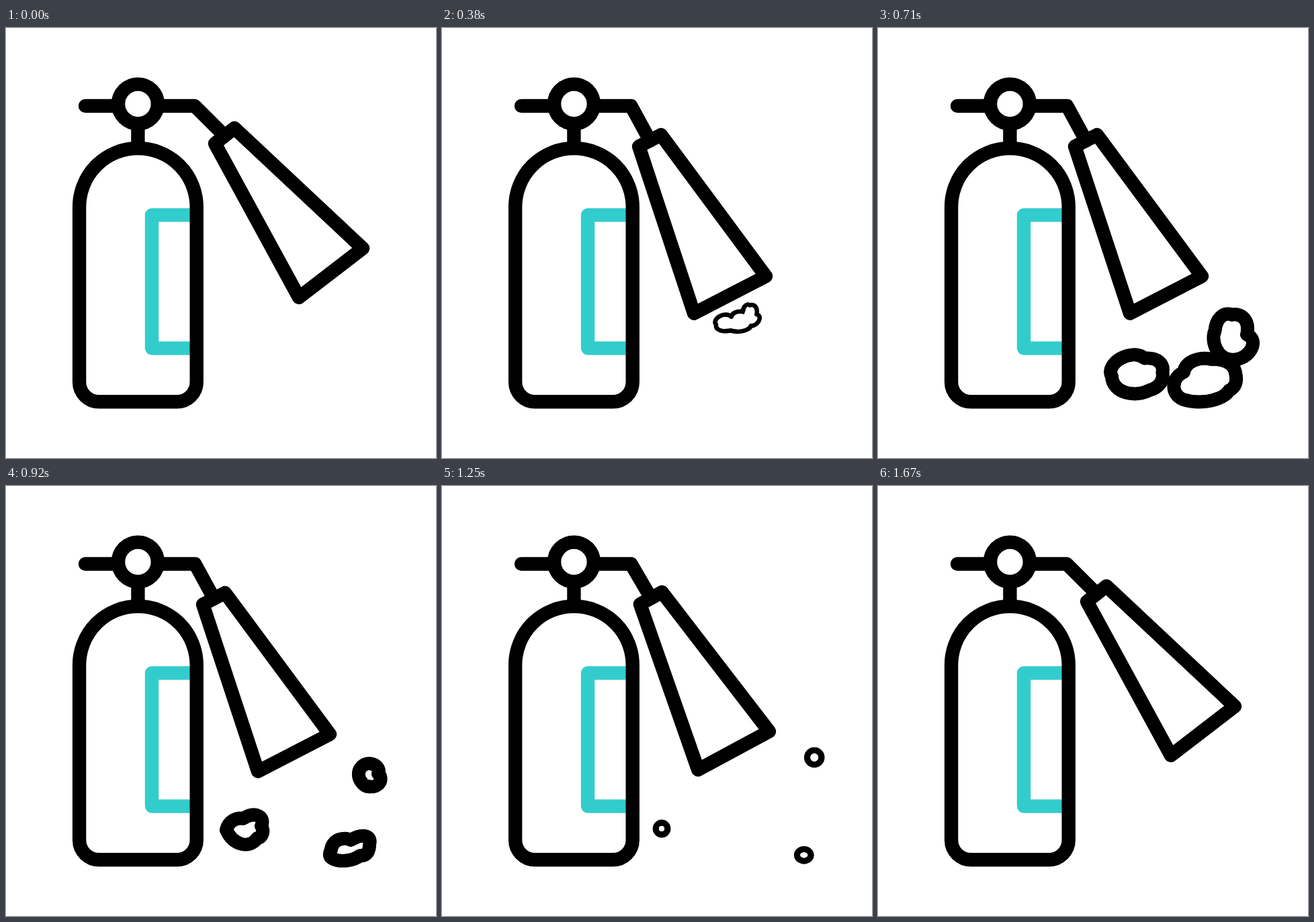
Write an HTML page that moves like this. It is 640 by 640 pixels and loops after 2040 ms.

```html
<!DOCTYPE html>
<html lang="en">
<head>
<meta charset="utf-8">
<title>Fire extinguisher</title>
<style>
  html, body { margin: 0; width: 100%; height: 100%; overflow: hidden; background: #fff; }
  svg { display: block; width: 100%; height: 100%; }
  .line { fill: none; stroke: #000; stroke-width: 20.4; stroke-linecap: round; stroke-linejoin: round; }
  .label { stroke: #3cc; }
  .foam path { stroke: #000; stroke-linejoin: round; }
</style>
</head>
<body>
<svg viewBox="0 0 640 640">
  <path class="line label" d="M280 278.4H217V476.6H280"/>
  <g class="line">
    <path d="M109.1 527V266.3a87.3 87.3 0 0 1 174.6 0V527a29.3 29.3 0 0 1-29.3 29.3H138.4A29.3 29.3 0 0 1 109.1 527Z"/>
    <path d="M196.4 145V176M118 116H165"/>
    <circle cx="196.4" cy="113" r="29.4"/>
    <path id="pipe"/>
    <path id="nozzle"/>
  </g>
  <defs id="masks"></defs>
  <g class="foam" id="edges" fill="none"></g>
  <g id="insides" fill="#fff"></g>
</svg>
<script>
const LOOP = 2040, FRAME = 1000 / 24;
const $ = id => document.getElementById(id);
const clamp = x => Math.min(1, Math.max(0, x));
const lerp = (a, b, p) => a + (b - a) * p;
const mix = (a, b, p) => a.map((v, i) => lerp(v, b[i], p));
const span = (f, from, to) => clamp((f - from) / (to - from));
const nums = s => s.match(/[\d.]+/g).map(Number);

// Cubic easing with horizontal handles, solved by bisection.
function ease(u) {
  let lo = 0, hi = 1;
  for (let i = 0; i < 24; i++) {
    const s = (lo + hi) / 2, r = 1 - s;
    if (3 * .46 * s * r * r + 3 * .52 * s * s * r + s ** 3 < u) lo = s; else hi = s;
  }
  return lo * lo * (3 - 2 * lo);
}

// A circle as n cubic curves, clockwise from the left.
function ring(cx, cy, rx, ry, n) {
  const k = 4 / 3 * Math.tan(Math.PI / 2 / n), out = [cx - rx, cy];
  const put = (c, s) => out.push(cx + rx * c, cy + ry * s);
  for (let i = 0; i < n; i++) {
    const a = Math.PI + i * 2 * Math.PI / n, b = a + 2 * Math.PI / n;
    put(Math.cos(a) - k * Math.sin(a), Math.sin(a) + k * Math.cos(a));
    put(Math.cos(b) + k * Math.sin(b), Math.sin(b) - k * Math.cos(b));
    put(Math.cos(b), Math.sin(b));
  }
  return out;
}

// Each puff: its part of the cloud, the loose puff, the last small ring.
const puffs = [
  {
    cloud: nums("364 524 343 500 404 462 432 489 450 496 458 504 458 518 458 532 448 545 428 551 402 557 359 553 364 524"),
    loose: nums("328 512 331 499 343 493 353 495 372 483 386 493 380 506 386 518 378 524 374 524 362 541 338 534 328 512"),
    dot: [327, 510, 8.7, 8.7]
  },
  {
    cloud: nums("432 489 436 472 458 463 483 466 508 474 520 486 525 500 530 512 528 522 519 531 512 550 468 562 428 551 400 540 400 500 432 489"),
    loose: nums("484 541 486 525 505 522 513 527 534 515 544 523 541 532 541 544 537 551 527 550 517 558 498 560 487 555 479 551 482 546 484 541"),
    dot: [538.8, 549.3, 10.3, 8.7]
  },
  {
    cloud: nums("483 466 486 445 500 428 515 438 532 432 551 445 545 479 574 487 551 529 519 531 480 530 470 485 483 466"),
    loose: nums("525 431 524 420 532 413 541 413 551 414 557 421 554 428 562 436 556 450 539 447 535 448 526 440 525 431"),
    dot: [554.2, 404, 10.6, 10.6]
  }
];

function add(parent, tag, attrs) {
  const el = document.createElementNS(parent.namespaceURI, tag);
  for (const k in attrs) el.setAttribute(k, attrs[k]);
  return parent.appendChild(el);
}
const stage = { x: 0, y: 0, width: 640, height: 640 };

// Puffs merge: all outlines first, then every inside on top.
puffs.forEach((p, i) => {
  const mask = add($("masks"), "mask", { id: "inside" + i, maskUnits: "userSpaceOnUse", ...stage });
  mask.classList.add("foam");
  p.paths = [add(mask, "path", { fill: "#fff" }), add($("edges"), "path", {})];
  add($("insides"), "rect", { ...stage, mask: `url(#inside${i})` });
  p.small = ring(...p.dot, (p.cloud.length - 2) / 6);
});

const raised = [340, 149, 311, 172, 436, 401, 531, 328];
const lowered = [326, 159, 293, 176.3, 375, 424.7, 482, 369.5];
const mouth = [430, 400];

function drawNozzle(f) {
  const p = f < 20 ? ease(span(f, 0, 8.1)) : 1 - ease(span(f, 27, 40));
  const n = mix(raised, lowered, p);
  $("nozzle").setAttribute("d", `M${n}Z`);
  $("pipe").setAttribute("d", `M228 116H${lerp(280.8, 281.4, p)}L${(n[0] + n[2]) / 2} ${(n[1] + n[3]) / 2}`);
}

function drawFoam(f) {
  const grow = span(f, 7, 13), fade = 1 - span(f, 30, 34);
  const size = grow * fade;
  const width = lerp(20.2, 9.4, span(f, 22, 30)) * size;
  for (const p of puffs) {
    const shape = f < 22 ? mix(p.cloud, p.loose, span(f, 13, 22)) : mix(p.loose, p.small, span(f, 22, 30));
    const origin = f < 20 ? mouth : p.dot;
    const pts = shape.map((v, i) => lerp(origin[i % 2], v, size).toFixed(2));
    const d = size ? `M${pts.slice(0, 2)}C${pts.slice(2)}Z` : "";
    for (const path of p.paths) {
      path.setAttribute("d", d);
      path.setAttribute("stroke-width", width);
    }
  }
}

function draw(now) {
  const f = Math.floor((now % LOOP + 2) / FRAME);
  drawNozzle(f);
  drawFoam(f);
}

let start;
function tick(now) {
  start ??= now;
  draw(now - start);
  requestAnimationFrame(tick);
}
draw(0);
requestAnimationFrame(tick);
</script>
</body>
</html>
```
